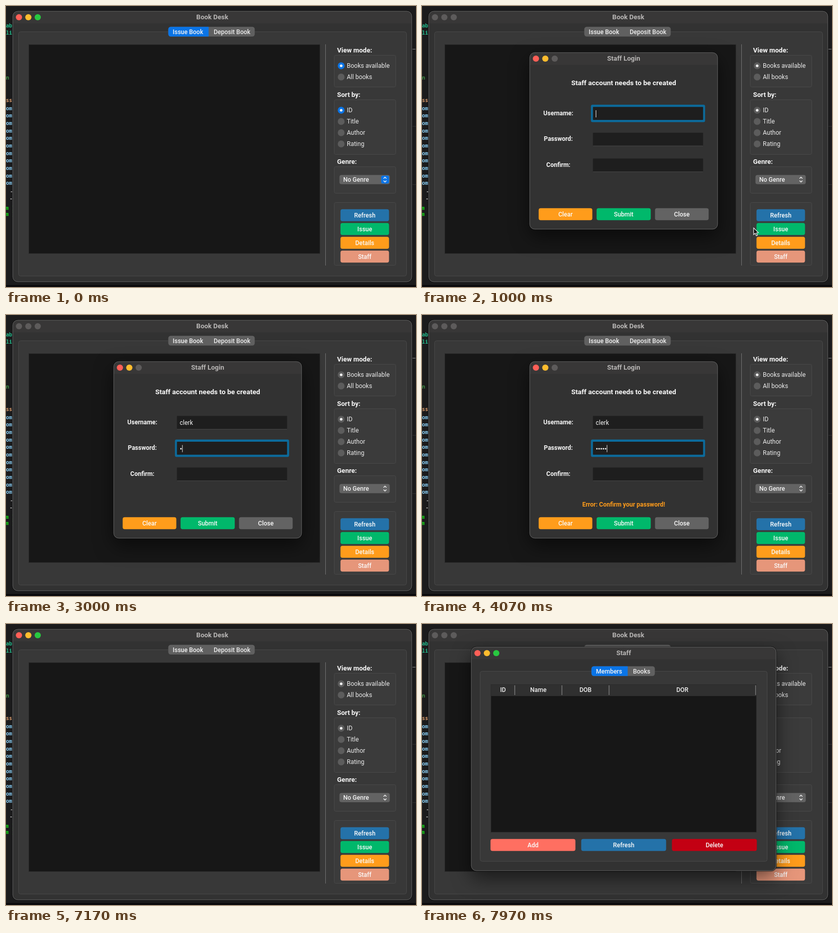
An HTML page with a canvas that plays this animation: 800 px wide and 550 px high, repeating every 8000 ms.

```html
<!DOCTYPE html>
<html lang="en">
<head>
<meta charset="utf-8">
<title>Book Desk</title>
<style>
html, body { margin: 0; width: 100%; height: 100%; overflow: hidden; background: #1b1b1b; }
canvas { display: block; width: 800px; height: 550px; }
</style>
</head>
<body>
<canvas id="stage" width="800" height="550"></canvas>
<script>
const ctx = document.getElementById('stage').getContext('2d');
const LOOP = 8000;
const BLUE = '#2472a9', GREEN = '#00b86b', ORANGE = '#ff9c1b', GREY = '#636363', ACCENT = '#0a74e6';

// Moments of the story, in ms
const OPEN_FORM = 830, CLOSE_FORM = 7170, OPEN_PANEL = 7230;
const TO_PASSWORD = 2470, TO_CONFIRM = 5030, SHOW_ERROR = 4030;
const USER = 'clerk';
const KEYS = {
  user: [1770, 1930, 2030, 2170, 2250],
  password: [2670, 3070, 3200, 3470, 3570],
  confirm: [5670, 5730, 5870, 6200, 6270]
};
const POINTER = [[30, 600, 552], [470, 692, 486], [830, 692, 486], [1000, 647.5, 435], [1300, 598, 352], [1770, 598, 352]];

const clamp = v => Math.max(0, Math.min(1, v));
const typed = (keys, t) => keys.filter(k => t >= k).length;

function box(x, y, w, h, r, fill, stroke) {
  ctx.beginPath();
  ctx.roundRect(x, y, w, h, r);
  if (fill) { ctx.fillStyle = fill; ctx.fill(); }
  if (stroke) { ctx.strokeStyle = stroke; ctx.lineWidth = 1; ctx.stroke(); }
}

// A filled control with slightly soft outer edges
const EDGE = 0.35;
function control(x, y, w, h, r, fill) {
  box(x - EDGE, y - EDGE, w + 2 * EDGE, h + 2 * EDGE, r, fill);
}

function text(s, x, y, { size = 12, weight = 400, color = '#ececec', align = 'left', family = 'Roboto, sans-serif' } = {}) {
  ctx.font = `${weight} ${size}px ${family}`;
  ctx.textAlign = align;
  ctx.fillStyle = color;
  ctx.fillText(s, x, y);
}

function disc(x, y, r, color) {
  ctx.beginPath();
  ctx.arc(x, y, r, 0, Math.PI * 2);
  ctx.fillStyle = color;
  ctx.fill();
}

function button(label, x, y, w, color) {
  control(x, y, w, 23, 4, color);
  text(label, x + w / 2, y + 15.5, { weight: 500, color: '#fafafa', align: 'center' });
}

function lights(x, y, colors) {
  colors.forEach((c, i) => disc(x + i * 18.3, y, 6.1, c));
}
const LIT = ['#ff5f57', '#febc2e', '#28c840'];
const DIM = ['#5d5b5b', '#5d5b5b', '#5d5b5b'];

function frame(x, y, w, h, title, colors, shadow) {
  ctx.save();
  if (shadow) {
    ctx.shadowColor = 'rgba(0,0,0,0.55)';
    ctx.shadowBlur = 36;
    ctx.shadowOffsetY = 14;
  }
  control(x, y, w, h, 10, '#323232');
  ctx.restore();
  box(x, y, w, 24, [10, 10, 0, 0], '#383737');
  box(x - 0.8, y - 0.8, w + 1.6, h + 1.6, 10.8, null, 'rgba(8,8,8,0.7)');
  box(x + 0.2, y + 0.2, w - 0.4, h - 0.4, 9.8, null, '#616161');
  lights(x + 12.3, y + 12, colors);
  text(title, x + w / 2, y + 16, { size: 13, weight: 700, color: '#b8b6b5', align: 'center' });
}

function tabs(x, y, widths, labels, active) {
  const total = widths[0] + widths[1];
  control(x, y, total, 18.5, 5, '#606060');
  if (active) control(x, y, widths[0], 18.5, [5, 0, 0, 5], ACCENT);
  text(labels[0], x + widths[0] / 2 - 1, y + 13.5, { weight: 500, color: '#f4f4f4', align: 'center' });
  text(labels[1], x + widths[0] + widths[1] / 2 + 1, y + 13.5, { weight: 500, color: '#ececec', align: 'center' });
}

function terminal() {
  ctx.fillStyle = '#1b1b1c';
  ctx.fillRect(0, 0, 800, 550);
  ctx.fillStyle = '#0b0a0c';
  ctx.fillRect(0, 546, 800, 4);
  const mono = (s, y, color, x = 0) => text(s, x, y, { size: 10, weight: 600, color, family: '"Noto Sans Mono", monospace' });
  mono('ab', 42, '#22bd8d');
  mono('li', 56, '#22bd8d');
  mono('n', 144, '#3f8f45');
  mono('ss', 188, '#cf9468');
  for (let i = 0; i < 11; i++) mono('om', 203.5 + i * 14.67, '#86c9ee');
  mono('-', 366, '#d0d0d0', 8);
  mono('-', 380, '#d0d0d0', 7);
  for (const y of [399, 411]) mono('m }', y, '#16d916', -1);
  ctx.fillStyle = '#8b8b8b';
  ctx.fillRect(793, 84, 6, 1);
  ctx.fillStyle = '#303030';
  ctx.fillRect(793, 235, 7, 1);
  ctx.fillRect(793, 349, 7, 1);
}

function radio(label, y, on, active) {
  disc(654, y, 6.7, on && active ? ACCENT : '#5c5c5c');
  if (on) disc(654, y, 2.6, '#f4f4f4');
  text(label, 665, y + 4.2);
}

function group(title, y, h) {
  if (title) text(title, 646, y - 5, { size: 13, weight: 700, color: '#f8f8f8' });
  box(640.5, y + 0.5, 120, h, 3, '#3b3b3b', '#494949');
}

function chevrons(x, y) {
  ctx.strokeStyle = '#f4f4f4';
  ctx.lineWidth = 1.4;
  for (const d of [-1, 1]) {
    ctx.beginPath();
    ctx.moveTo(x - 2.8, y + d * 2);
    ctx.lineTo(x, y + d * 4.8);
    ctx.lineTo(x + 2.8, y + d * 2);
    ctx.stroke();
  }
}

function mainWindow(active, lit) {
  frame(13, 10, 779, 530, 'Book Desk', lit ? LIT : DIM);
  box(24.5, 50.5, 757, 478, 4, '#383838', '#484848');
  tabs(317, 41, [78, 90], ['Issue Book', 'Deposit Book'], active);
  ctx.fillStyle = '#171717';
  ctx.fillRect(44, 75, 569, 410);
  ctx.strokeStyle = '#2b2b2b';
  ctx.lineWidth = 1;
  ctx.strokeRect(44.5, 75.5, 568, 409);
  ctx.fillStyle = '#727272';
  ctx.fillRect(623, 75, 1, 433);

  group('View mode:', 96, 62);
  radio('Books available', 117, true, active);
  radio('All books', 139, false, active);
  group('Sort by:', 183, 107);
  ['ID', 'Title', 'Author', 'Rating'].forEach((s, i) => radio(s, 204 + i * 22, i === 0, active));
  group('Genre:', 314, 52);
  control(651, 331, 97.5, 17.5, 4, GREY);
  text('No Genre', 658, 344, { weight: 500, color: '#f2f2f2' });
  if (active) box(732, 332, 15.5, 15.5, 3.5, ACCENT);
  chevrons(739.5, 339.7);
  group('', 384, 123);
  button('Refresh', 653, 398, 94, BLUE);
  button('Issue', 653, 425, 94, GREEN);
  button('Details', 653, 452, 94, ORANGE);
  button('Staff', 653, 479, 94, '#e6967a');
}

// Runs draw() with the zoom and fade of a window that opens
function opening(t, start, length, cx, cy, draw) {
  const p = clamp((t - start) / length);
  if (p === 1) return draw();
  const k = 0.82 + 0.18 * p;
  ctx.save();
  ctx.globalAlpha = clamp(p * 1.8);
  ctx.translate(cx, cy);
  ctx.scale(k, k);
  ctx.translate(-cx, -cy);
  draw();
  ctx.restore();
}

function field(label, y, focused, caretX, content) {
  text(label, 266, y + 3.8, { weight: 700, color: '#f8f8f8', align: 'center' });
  if (focused) control(330, y - 16.5, 222, 33.5, 3, '#0c6b9c');
  box(333.5, y - 12.5, 215, 25.5, 1, '#1e1e1e');
  if (!focused) {
    ctx.fillStyle = '#454545';
    ctx.fillRect(334, y + 13, 214, 1);
  }
  content();
  if (focused && caretX) {
    ctx.fillStyle = '#e8e8e8';
    ctx.fillRect(caretX, y - 6, 1, 14);
  }
}

function secret(label, y, keys, t, focused, blinkOff) {
  const n = typed(keys, t);
  const caret = blinkOff ? 0 : 339.5 + n * 4.2;
  field(label, y, focused, caret, () => {
    for (let i = 0; i < n; i++) disc(341.3 + i * 4.2, y + 1.3, 1.5, '#f4f4f4');
  });
}

function form(t) {
  frame(210, 91, 367, 346, 'Staff Login', [LIT[0], LIT[1], DIM[2]], true);
  text('Staff account needs to be created', 393.5, 155.3, { size: 13.5, weight: 700, color: '#fafafa', align: 'center' });

  const name = USER.slice(0, typed(KEYS.user, t));
  ctx.font = '400 12px Roboto, sans-serif';
  const caret = 339 + Math.round(ctx.measureText(name).width);
  field('Username:', 210, t < TO_PASSWORD, caret, () => text(name, 339, 215, { color: '#f8f8f8' }));
  secret('Password:', 260.5, KEYS.password, t, t >= TO_PASSWORD && t < TO_CONFIRM, t >= 4630);
  secret('Confirm:', 311, KEYS.confirm, t, t >= TO_CONFIRM, t >= 6870);

  if (t >= SHOW_ERROR) {
    text('Error: Confirm your password!', 393.5, 374.5, { weight: 700, color: ORANGE, align: 'center' });
  }
  button('Clear', 228, 396, 104, ORANGE);
  button('Submit', 341, 396, 105, GREEN);
  button('Close', 455, 396, 104, GREY);
}

function panel() {
  frame(96, 45, 595, 438, 'Staff', LIT, true);
  box(113.5, 92.5, 560, 372, 4, '#383838', '#484848');
  tabs(331, 83, [70, 53], ['Members', 'Books'], true);
  ctx.fillStyle = '#171717';
  ctx.fillRect(134, 118, 519, 290);
  ctx.fillStyle = '#303030';
  ctx.fillRect(135, 118, 517, 23);
  ctx.fillStyle = '#999';
  for (const x of [180.5, 272.5, 364.5, 650.5]) ctx.fillRect(x, 120, 1, 19);
  const heads = { ID: 158, Name: 227, DOB: 319, DOR: 508 };
  for (const s in heads) text(s, heads[s], 133, { weight: 500, color: '#f0f0f0', align: 'center' });
  ctx.strokeStyle = '#2b2b2b';
  ctx.lineWidth = 1;
  ctx.strokeRect(134.5, 118.5, 518, 289);
  button('Add', 134, 421, 165, '#ff6f61');
  button('Refresh', 311, 421, 165, BLUE);
  button('Delete', 488, 421, 165, '#c30013');
}

function pointer(t) {
  const i = POINTER.findIndex(p => p[0] > t);
  if (i < 1) return;
  const [t0, x0, y0] = POINTER[i - 1], [t1, x1, y1] = POINTER[i];
  const p = (t - t0) / (t1 - t0);
  const e = i === 3 ? p : p * (2 - p);
  ctx.save();
  ctx.translate(x0 + (x1 - x0) * e, y0 + (y1 - y0) * e);
  ctx.beginPath();
  [[0, 0], [0, 13], [3, 10.3], [5.1, 15.2], [7.4, 14.2], [5.3, 9.5], [9.3, 9.3]].forEach(q => ctx.lineTo(...q));
  ctx.closePath();
  ctx.fillStyle = '#0a0a0a';
  ctx.strokeStyle = '#f2f2f2';
  ctx.lineWidth = 1.2;
  ctx.fill();
  ctx.stroke();
  ctx.restore();
}

function draw(t) {
  const active = t < OPEN_FORM;
  terminal();
  mainWindow(active, active || (t >= CLOSE_FORM && t < OPEN_PANEL));
  if (!active && t < CLOSE_FORM) opening(t, OPEN_FORM, 160, 393.5, 264, () => form(t));
  if (t >= OPEN_PANEL) opening(t, OPEN_PANEL, 200, 393.5, 264, panel);
  pointer(t);
}

const start = performance.now();
function tick() {
  draw((performance.now() - start) % LOOP);
  requestAnimationFrame(tick);
}
tick();
</script>
</body>
</html>
```
